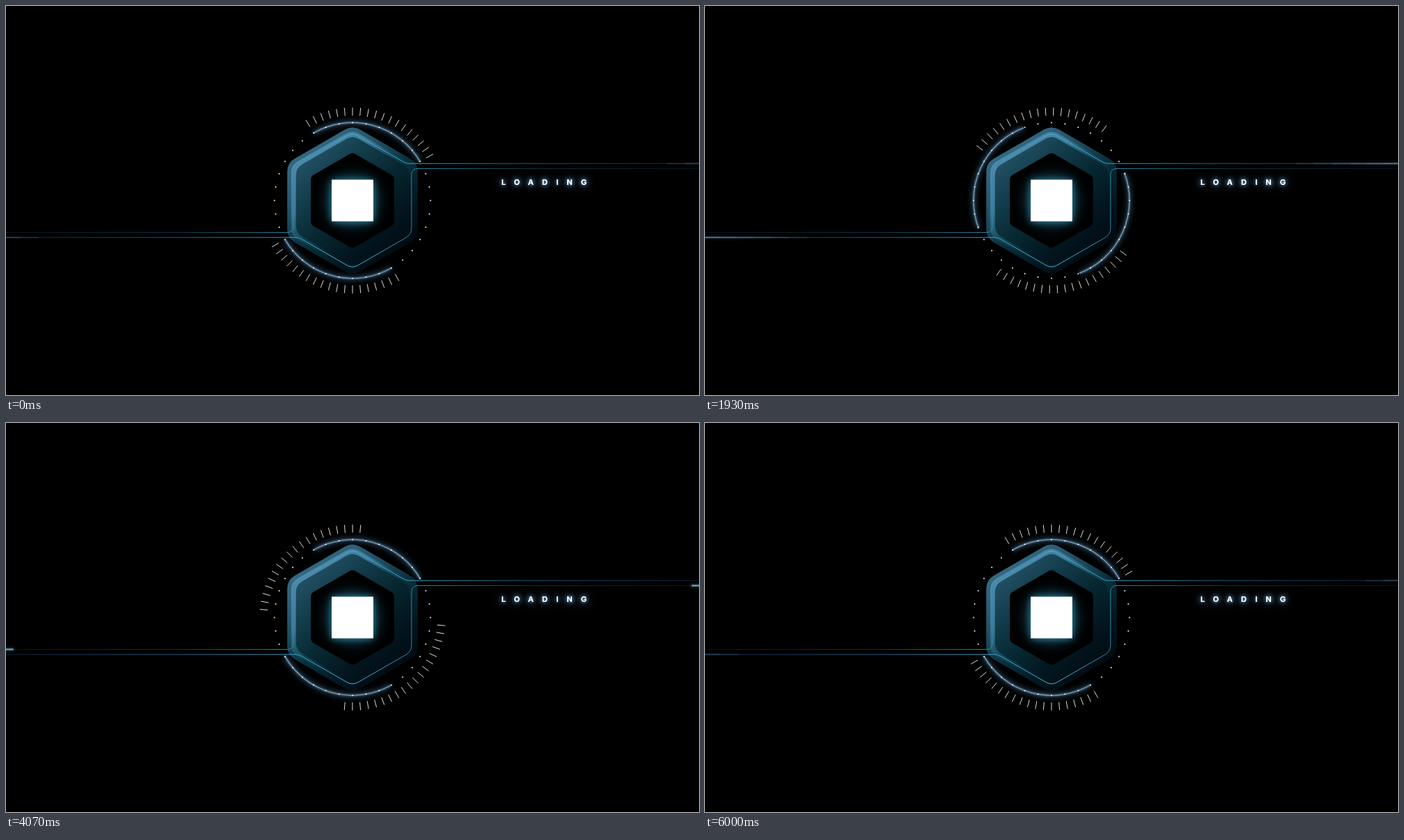
These frames come from a looping animation (998x561 px, 6030 ms). An HTML page with a canvas:

```html
<!DOCTYPE html>
<html lang="en">
<head>
<meta charset="utf-8">
<title>Loading</title>
<style>
  html, body { margin: 0; width: 100%; height: 100%; overflow: hidden; background: #000; }
  canvas { display: block; }
</style>
</head>
<body>
<canvas id="stage" width="998" height="561"></canvas>
<script>
const ctx = document.getElementById('stage').getContext('2d');
const LOOP = 6030, CX = 499, CY = 280.5, RING = 112.3;
const rad = deg => deg * Math.PI / 180;
const fromTop = deg => rad(deg - 90);

function hexagon(radius, corner) {
  const path = new Path2D();
  const at = i => [radius * Math.sin(rad(60 * i)), -radius * Math.cos(rad(60 * i))];
  const [ax, ay] = at(0), [bx, by] = at(-1);
  path.moveTo((ax + bx) / 2, (ay + by) / 2);
  for (let i = 0; i < 6; i++) path.arcTo(...at(i), ...at(i + 1), corner);
  path.closePath();
  return path;
}

function withStops(gradient, stops) {
  stops.forEach(([at, color]) => gradient.addColorStop(at, color));
  return gradient;
}
const linear = (x0, y0, x1, y1, ...stops) =>
  withStops(ctx.createLinearGradient(x0, y0, x1, y1), stops);
const radial = (radius, ...stops) =>
  withStops(ctx.createRadialGradient(0, 0, 0, 0, 0, radius), stops);

// One wire; the other is the same wire turned by half a circle.
const wire = new Path2D();
wire.moveTo(-499, 46);
wire.arcTo(-85, 46, -85, 0, 8);
wire.arcTo(-85, -49, 0, -98, 16);
wire.arcTo(0, -98, 85, -49, 16);
wire.arcTo(77.5, -53.3, 499, -53.3, 16);
wire.lineTo(499, -53.3);

const wireColor = linear(-499, 0, 499, 0,
  [0, '#04141d'], [0.25, '#0b3444'], [0.41, '#2b86a6'], [0.5, '#43b4d8'],
  [0.59, '#3a9fc6'], [0.75, '#1b5c80'], [1, '#0a2237']);

const layers = [
  [hexagon(108.5, 22), linear(-75, -85, 65, 85,
    [0, '#38708a'], [0.3, '#235268'], [0.55, '#092f3b'], [0.8, '#02151e'], [1, '#01080d'])],
  [hexagon(102, 20), linear(-75, -75, 60, 70,
    [0, '#568fb0'], [0.3, '#3d7895'], [0.5, '#134453'], [0.75, '#031b25'], [1, '#010c13'])],
  [hexagon(94, 18), linear(-70, -70, 60, 75,
    [0, '#25546a'], [0.25, '#143f4e'], [0.55, '#062630'], [0.8, '#03151e'], [1, '#010d14'])],
  [hexagon(69.3, 8), '#000'],
  [hexagon(69.3, 8), radial(60,
    [0, '#2b86a0'], [0.5, 'rgba(18,70,88,.7)'], [0.75, 'rgba(4,26,34,.4)'], [1, 'rgba(0,0,0,0)'])]
];

// Short ease-in, then steady speed.
const launch = u => u < 0.12 ? u * u / 0.2256 : (u - 0.06) / 0.94;
const easeInOut = u => u < 0.5 ? 2 * u * u : 1 - 2 * (1 - u) ** 2;

// Swings counter-clockwise until `turn`, then returns by the sixth second.
function swing(t, turn, angle) {
  const part = t < turn ? launch(t / turn) : 1 - easeInOut((t - turn) / (6 - turn));
  return -angle * part;
}

function twice(draw) {
  for (const turn of [0, Math.PI]) {
    ctx.save();
    ctx.rotate(turn);
    draw();
    ctx.restore();
  }
}

function drawTicks(turn) {
  ctx.strokeStyle = '#dcdcd8';
  ctx.lineWidth = 1;
  ctx.beginPath();
  for (let deg = -30; deg <= 60; deg += 5) {
    const a = fromTop(deg + turn), c = Math.cos(a), s = Math.sin(a);
    ctx.moveTo(c * 122.5, s * 122.5);
    ctx.lineTo(c * 134, s * 134);
  }
  ctx.stroke();
}

function drawArc(turn) {
  ctx.beginPath();
  ctx.arc(0, 0, RING, fromTop(turn - 30), fromTop(turn + 60));
  ctx.shadowColor = '#5f95bd';
  ctx.shadowBlur = 8;
  ctx.strokeStyle = 'rgba(95,145,185,.25)';
  ctx.lineWidth = 5;
  ctx.stroke();
  ctx.strokeStyle = '#7ba6c2';
  ctx.lineWidth = 1.3;
  ctx.stroke();
}

function drawDots() {
  ctx.fillStyle = '#f2f6f8';
  for (let deg = 0; deg < 360; deg += 10) {
    const a = fromTop(deg);
    ctx.beginPath();
    ctx.arc(Math.cos(a) * RING, Math.sin(a) * RING, 1, 0, 7);
    ctx.fill();
  }
}

// Overlapping strokes that all end at the head make the tail fade.
function drawPulse(head) {
  const steps = 14, tail = 290;
  ctx.strokeStyle = 'rgba(130,190,222,.1)';
  ctx.shadowColor = 'rgba(70,140,190,.5)';
  ctx.shadowBlur = 3;
  ctx.lineWidth = 2;
  for (let i = 1; i <= steps; i++) {
    const size = tail * (i / steps) ** 1.3;
    if (head <= 0 || head - size > 1120) continue;
    ctx.setLineDash([size, 5000]);
    ctx.lineDashOffset = size - head;
    ctx.stroke(wire);
  }
}

function drawWire(t) {
  ctx.strokeStyle = wireColor;
  ctx.lineWidth = 1;
  ctx.stroke(wire);
  const now = Math.floor(t);
  for (const cycle of [now - 1, now]) {
    // The first pulse leaves a little early.
    drawPulse(1445 * (t - cycle) - (cycle === 0 ? 47 : 92));
  }
}

function drawEmblem() {
  ctx.save();
  ctx.shadowColor = '#2f89a6';
  ctx.shadowBlur = 10;
  ctx.fillStyle = '#fff';
  ctx.fillRect(-30, -30, 60, 60);
  ctx.restore();
}

function drawLabel(t) {
  const glow = (1 + Math.cos(Math.PI * t)) / 2;
  ctx.save();
  ctx.font = '600 11px Inter, "DejaVu Sans", sans-serif';
  ctx.letterSpacing = '12.2px';
  ctx.fillStyle = '#fff';
  ctx.shadowColor = `rgba(110,170,215,${0.2 + 0.8 * glow})`;
  for (const blur of [14, 9, 5]) {
    ctx.shadowBlur = blur;
    ctx.fillText('LOADING', 713.5, 258);
  }
  ctx.restore();
}

function frame() {
  const t = Math.min(6, performance.now() % LOOP / 1000);
  ctx.fillStyle = '#000';
  ctx.fillRect(0, 0, 998, 561);
  ctx.save();
  ctx.translate(CX, CY);
  for (const [shape, fill] of layers) {
    ctx.fillStyle = fill;
    ctx.fill(shape);
  }
  twice(() => drawTicks(swing(t, 5, 68.5)));
  twice(() => drawArc(swing(t, 4, 180)));
  drawDots();
  twice(() => drawWire(t));
  drawEmblem();
  ctx.restore();
  drawLabel(t);
  requestAnimationFrame(frame);
}
frame();
</script>
</body>
</html>
```
